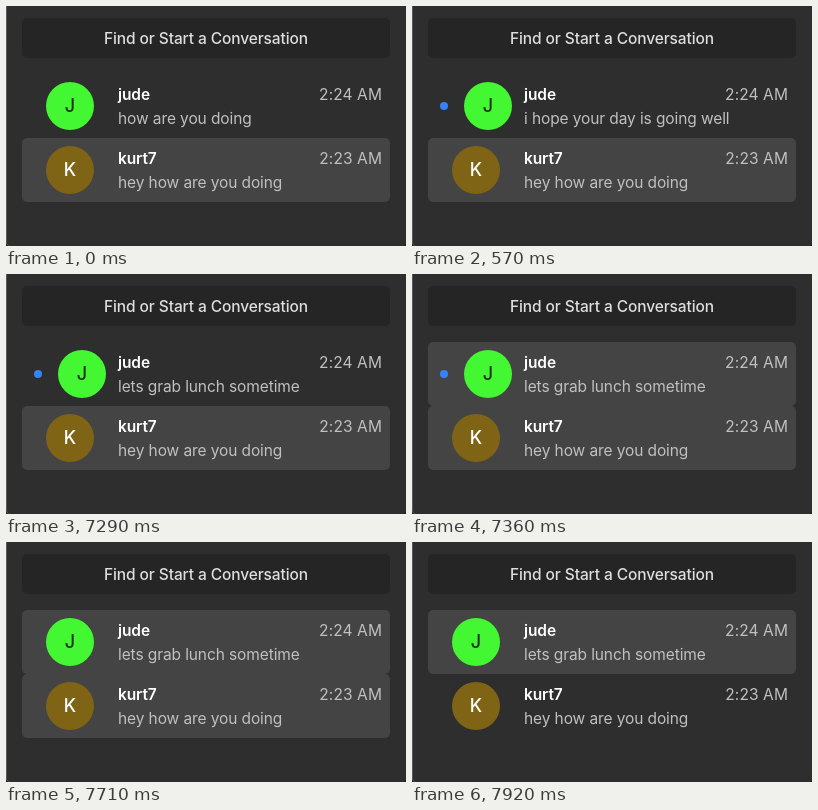
Write an HTML page that moves like this. It is 400 px wide and 240 px high and loops after 7.99 s.

```html
<!DOCTYPE html>
<html lang="en">
<head>
<meta charset="utf-8">
<title>Conversations</title>
<style>
  html, body { margin: 0; width: 100%; height: 100%; overflow: hidden; background: #1f1f1f; }
  body { font: 15.5px/24px Inter, sans-serif; letter-spacing: -.1px; color: #c0c0c0; }
  #stage { position: relative; width: 400px; height: 240px; overflow: hidden; background: #2e2e2e;
    border-radius: 0 0 4px 4px; box-shadow: inset 1px 0 #585858; }
  #stage * { box-sizing: border-box; white-space: nowrap; }
  .find { position: absolute; left: 16px; top: 12px; width: 368px; height: 40px; border-radius: 5px;
    background: #252525; color: #dedede; font-weight: 500; line-height: 42px; text-align: center; }
  .row { position: absolute; left: 16px; width: 368px; height: 64px; }
  .row > * { position: absolute; }
  .glow { inset: 0; border-radius: 5px; background: #444; }
  .avatar { left: 24px; top: 8px; width: 48px; height: 48px; border-radius: 50%;
    font-size: 18px; font-weight: 500; line-height: 48px; text-align: center; }
  .name { left: 96px; top: 9px; color: #fff; font-weight: 600; }
  .time { right: 8px; top: 9px; letter-spacing: .1px; }
  .msg { left: 96px; top: 33px; }
  .dot { left: 12px; top: 28px; width: 8px; height: 8px; border-radius: 50%; background: #3583f6; }
</style>
</head>
<body>
<div id="stage">
  <div class="find">Find or Start a Conversation</div>
  <div class="row" style="top:68px">
    <div class="glow" id="hoverA"></div>
    <div class="dot" id="dot"></div>
    <div class="avatar" id="avatar" style="background:#43f732;color:#1c2f1a">J</div>
    <div class="name">jude</div>
    <div class="time">2:24 AM</div>
    <div class="msg" id="msg1">how are you doing</div>
    <div class="msg" id="msg2">i hope your day is going well</div>
    <div class="msg" id="msg3">lets grab lunch sometime</div>
  </div>
  <div class="row" style="top:132px">
    <div class="glow" id="hoverB"></div>
    <div class="avatar" style="background:#806416;color:#fff">K</div>
    <div class="name">kurt7</div>
    <div class="time">2:23 AM</div>
    <div class="msg">hey how are you doing</div>
  </div>
</div>
<script>
const LOOP = 7990;

// steps: [time in ms, value], each value held until the next
function play(id, prop, steps) {
  const frames = steps.map(([t, v]) => ({ offset: t / LOOP, [prop]: v, easing: 'step-end' }));
  frames.push({ offset: 1, [prop]: steps[steps.length - 1][1] });
  return document.getElementById(id).animate(frames, { duration: LOOP, iterations: Infinity });
}

const shift = x => `translateX(${x}px)`;

const anims = [
  play('msg1', 'opacity', [[0, 1], [500, 0]]),
  play('msg2', 'opacity', [[0, 0], [500, 1], [5960, 0]]),
  play('msg3', 'opacity', [[0, 0], [5960, 1]]),
  play('dot', 'opacity', [[0, 0], [500, .5], [570, 1], [7640, .5], [7710, 0]]),
  play('avatar', 'transform', [[0, shift(0)], [500, shift(6)], [570, shift(12)], [7640, shift(6)], [7710, shift(0)]]),
  play('hoverA', 'opacity', [[0, 0], [7290, .03], [7360, 1]]),
  play('hoverB', 'opacity', [[0, 1], [7850, .5], [7920, 0]])
];

// one shared start keeps every part in step
const start = document.timeline.currentTime || 0;
anims.forEach(a => a.startTime = start);
</script>
</body>
</html>
```
